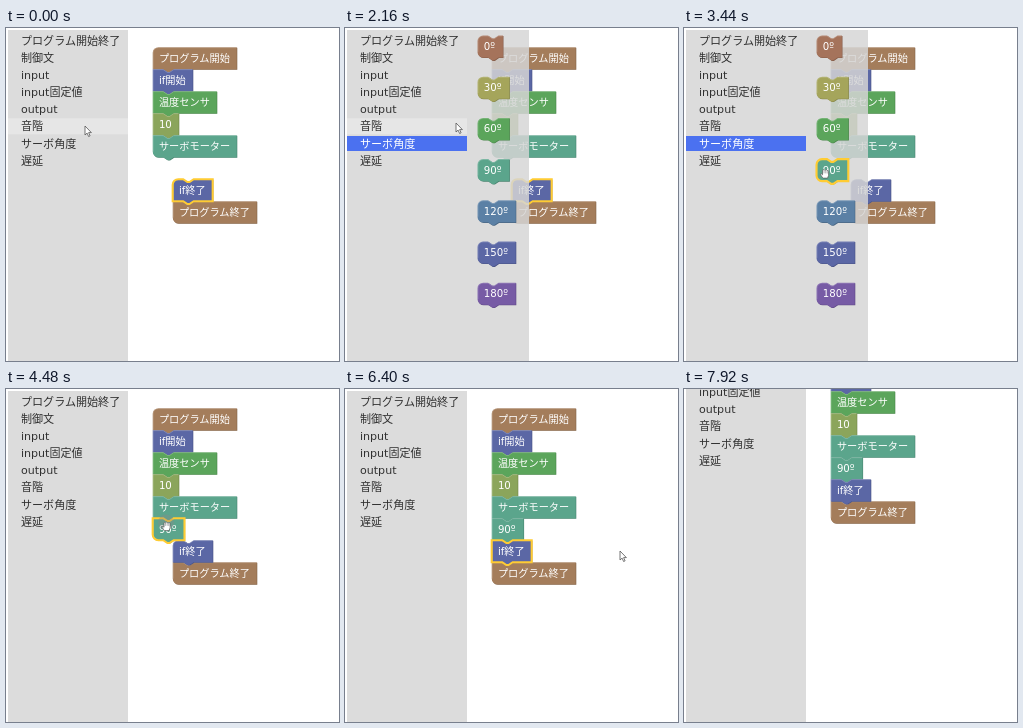
Recreate the animation shown at these times as an HTML page. Size 333 by 333 pixels, loop 8 s.

```html
<!DOCTYPE html>
<html lang="ja">
<head>
<meta charset="utf-8">
<title>Block editor</title>
<style>
html, body { margin: 0; width: 100%; height: 100%; overflow: hidden; background: #fff; }
svg { display: block; width: 100vw; height: 100vh; }
text { font-family: 'DejaVu Sans', 'Noto Sans CJK JP', sans-serif; }
.menu text { font-size: 11.07px; }
.block text { font-size: 10.2px; fill: #fff; }
</style>
</head>
<body>
<svg id="stage" viewBox="0 0 333 333"></svg>
<script>
const LOOP = 8000, ROW = 17.15, STEP = 22, LEFT = 146.7, TOP = 19.2;
const BROWN = '#a47d5b', BLUE = '#5b67a5', GREEN = '#5ba55b', TEAL = '#5ba58c';
const OPEN = 1840, PRESS = 3280, DRAG = 3500, DROP = 4400;
const GRAB = 5000, JOIN = 5600, DESELECT = 6900;

const stage = document.getElementById('stage');

function add(parent, tag, attrs = {}, text = '') {
  const el = document.createElementNS('http://www.w3.org/2000/svg', tag);
  set(el, attrs);
  el.textContent = text;
  parent.append(el);
  return el;
}
function set(el, attrs) {
  for (const k in attrs) el.setAttribute(k, attrs[k]);
}
function show(el, on) {
  el.setAttribute('visibility', on ? 'inherit' : 'hidden');
}
const move = (el, x, y) => set(el, { transform: `translate(${x.toFixed(2)} ${y.toFixed(2)})` });

// Piecewise eased track of [time, ...values]
function at(track, t) {
  const i = track.findIndex(k => k[0] > t);
  if (i < 0) return track[track.length - 1].slice(1);
  const a = track[i - 1], b = track[i];
  const p = (t - a[0]) / (b[0] - a[0]), e = p * p * (3 - 2 * p);
  return a.slice(1).map((v, j) => v + (b[j + 1] - v) * e);
}

function outline(w, o) {
  return (o.head ? 'M0,5.6A5.6,5.6 0 0 1 5.6,0' : 'M0,0') +
    (o.first ? '' : 'H10.5l4.2,2.8h2.1l4.2,-2.8') + `H${w}V${STEP}` +
    (o.last ? '' : 'H21l-4.2,2.8h-2.1l-4.2,-2.8') +
    (o.tail ? 'H5.6A5.6,5.6 0 0 1 0,16.4' : 'H0') + 'Z';
}
function topEdge(w, o) {
  return (o.tail ? 'M.4,16.4' : 'M.4,21.6') + (o.head ? 'V5.6A5.2,5.2 0 0 1 5.6,.4' : 'V.4') +
    (o.first ? '' : 'H10.5l4.2,2.8h2.1l4.2,-2.8') + `H${w - .4}`;
}

function makeBlock(parent, label, w, color, opts = {}) {
  const g = add(parent, 'g', { class: 'block' });
  const shade = add(g, 'path', { fill: color, transform: 'translate(.6 .6)', style: 'filter:brightness(.8)' });
  const face = add(g, 'path', { fill: color });
  const light = add(g, 'path', { fill: 'none', stroke: '#fff', 'stroke-opacity': .3, 'stroke-width': .7 });
  const ring = add(g, 'path', { fill: 'none', stroke: '#fc3', 'stroke-width': 2.1 });
  add(g, 'text', { x: 6.2, y: 14.6 }, label);
  const block = {
    g,
    shape(change) {
      Object.assign(opts, change);
      const d = outline(w, opts);
      for (const p of [shade, face, ring]) set(p, { d });
      set(light, { d: topEdge(w, opts) });
    },
    select(on) { show(ring, on); }
  };
  block.shape({});
  block.select(false);
  return block;
}

const page = add(stage, 'g');
const work = add(page, 'g');

const stack = [
  ['プログラム開始', 84, BROWN, { head: true, first: true }],
  ['if開始', 40, BLUE],
  ['温度センサ', 64, GREEN],
  ['10', 26, '#8ba55b'],
  ['サーボモーター', 84, TEAL]
].map((b, i) => {
  const block = makeBlock(work, ...b);
  move(block.g, LEFT, TOP + i * STEP);
  return block;
});
const servo = stack[4];
const finish = makeBlock(work, 'プログラム終了', 84, BROWN, { tail: true, last: true });
const endIf = makeBlock(work, 'if終了', 40, BLUE);
const angle = makeBlock(work, '90º', 31.8, TEAL, { head: true, tail: true });

const menu = add(page, 'g', { class: 'menu' });
add(menu, 'rect', { x: 2, y: 2, width: 120, height: 420, fill: '#dcdcdc' });
const hover = add(menu, 'rect', { x: 2, width: 120, height: 16, fill: '#e6e6e6' });
const active = add(menu, 'rect', { x: 2, y: 108, width: 120, height: 15, fill: '#4b71f0' });
const rowY = i => 12.5 + i * ROW;
const items = ['プログラム開始終了', '制御文', 'input', 'input固定値', 'output', '音階', 'サーボ角度', '遅延']
  .map((s, i) => add(menu, 'text', { x: 15, y: rowY(i) + 4.2, fill: '#303030' }, s));

const flyout = add(page, 'g');
add(flyout, 'rect', { x: 122, y: 2, width: 62, height: 331, fill: '#d6d6d6', 'fill-opacity': .84 });
const choices = ['#a5735b', '#a5a55b', GREEN, TEAL, '#5b80a5', BLUE, '#775ba5'].map((color, i) => {
  const label = i * 30 + 'º';
  const block = makeBlock(flyout, label, 12.6 + 6.4 * label.length, color, { head: true, tail: true });
  move(block.g, 132.5, 7.5 + i * 41.2);
  return block;
});

const pointer = add(stage, 'g', { fill: '#fff', stroke: '#555', 'stroke-width': .8, 'stroke-linejoin': 'round' });
const pulse = add(pointer, 'circle', { cy: -2, r: 8, fill: '#888', stroke: 'none' });
const arrow = add(pointer, 'path', { d: 'M0,0V9l2.1,-1.9 1.5,3.4 1.5,-.7 -1.5,-3.2h2.8Z' });
const hand = add(pointer, 'g', { transform: 'scale(.85)' });
add(hand, 'path', {
  d: 'M-2.6,6.2L-4.5,3.4q-.5,-1.5 1,-1.2l1.2,1.1V-2q.9,-1.4 1.8,0q.9,-1.6 1.9,0q1,-1.2 1.8,.3q1.2,-.8 1.6,.6V4L3.6,7.2H-1.6Z'
});
add(hand, 'path', { d: 'M-.5,-1.8V1.6M1.4,-1.8V1.6M3.2,-1.4V1.8', fill: 'none', 'stroke-width': .5 });

const cursorTrack = [
  [0, 79, 98], [300, 79, 98], [1300, 36, 113], [1840, 36, 113],
  [2160, 111, 95], [2950, 140.5, 144], [DRAG, 140.5, 144],
  [4300, 160, 135.5], [4500, 160, 135.5], [4900, 180, 163], [GRAB, 180, 163],
  [5500, 161, 168], [JOIN, 161, 168], [6300, 275, 162], [6450, 275, 162],
  [7040, 310, 235], [7300, 342, 238]
];
const scrollTrack = [[0, 0], [7200, 0], [7840, 61]];

function draw(t) {
  const [cx, cy] = at(cursorTrack, t);
  const isOpen = t >= OPEN && t < DRAG;

  // Menu and flyout
  const row = Math.floor((cy - rowY(0)) / ROW + .5);
  show(hover, cx < 122 && row >= 0 && row < items.length);
  set(hover, { y: rowY(row) - 8 });
  show(active, isOpen);
  set(items[6], { fill: isOpen ? '#fff' : '#303030' });
  show(flyout, isOpen);
  choices[3].select(isOpen && t >= PRESS);

  // Angle block: dragged, then snapped below the servo block
  const dropped = t >= DROP, joined = t >= JOIN;
  show(angle.g, t >= DRAG);
  if (dropped) move(angle.g, LEFT, TOP + 5 * STEP);
  else move(angle.g, cx - 8, cy - 13);
  angle.shape({ head: !dropped, tail: !joined });
  servo.shape({ tail: !dropped });

  // Closing pair
  let x = LEFT + 20, y = TOP + 6 * STEP;
  if (joined) x = LEFT;
  else if (t >= GRAB) { x += cx - 180; y += cy - 163; }
  move(endIf.g, x, y);
  move(finish.g, x, y + STEP);
  endIf.shape({ head: !joined });

  const angleOn = t >= PRESS && t < GRAB;
  angle.select(t >= DRAG && angleOn);
  endIf.select(!angleOn && t < DESELECT);
  work.append(...(angleOn ? [endIf.g, angle.g] : [angle.g, endIf.g]));

  const [scroll] = at(scrollTrack, t);
  move(page, 0, -scroll);

  const overBlock = (t > 2880 && t < 4560) || (t > 4800 && t < 5720);
  show(arrow, !overBlock);
  show(hand, overBlock);
  const fade = dropped ? Math.max(0, 1 - (t - DROP) / 300) : 0;
  set(pulse, { 'fill-opacity': .5 * fade });
  move(pointer, cx, cy);
}

const start = performance.now();
function tick() {
  draw((performance.now() - start) % LOOP);
  requestAnimationFrame(tick);
}
tick();
</script>
</body>
</html>
```
